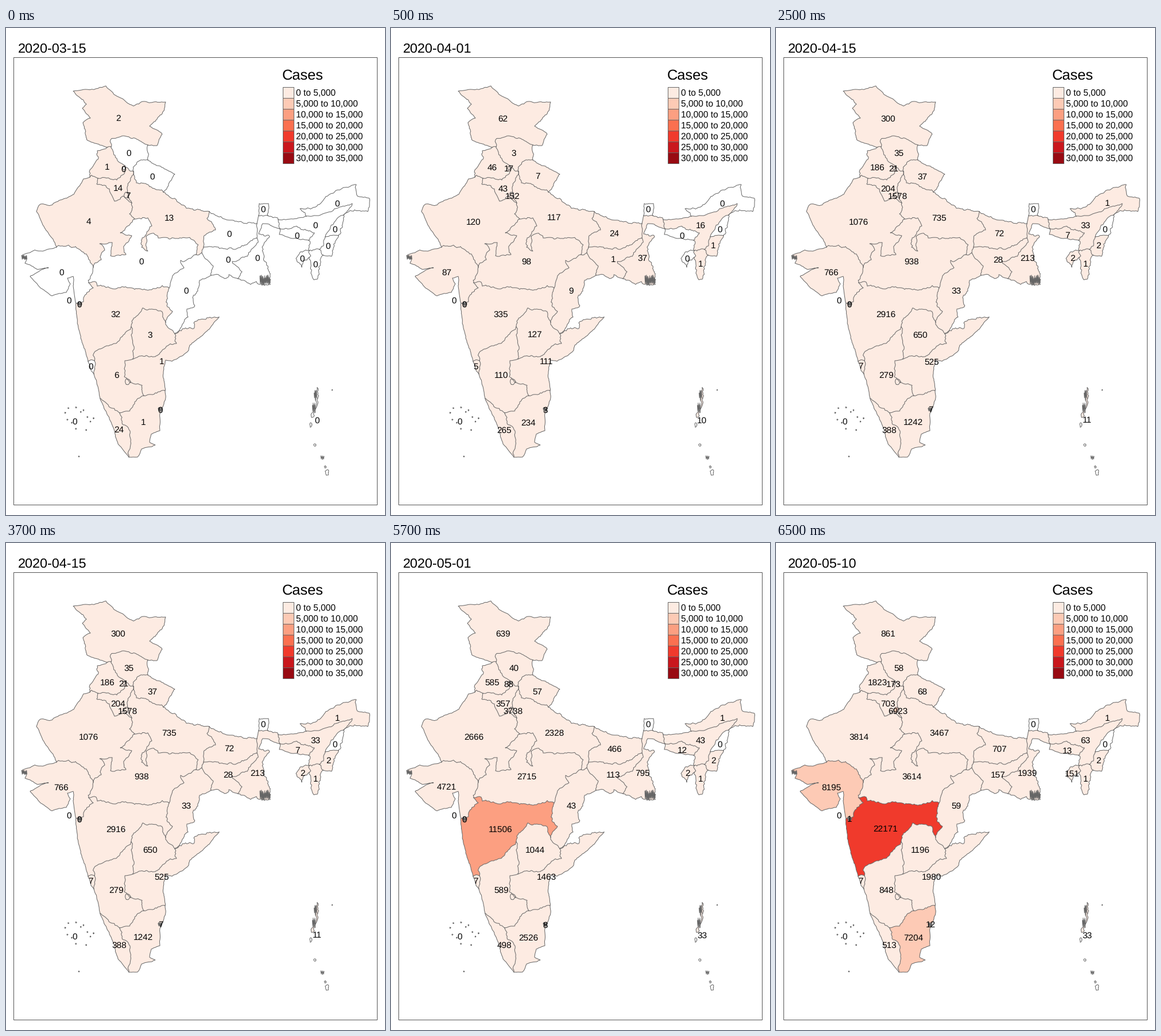
These frames come from a looping animation (660 by 849 pixels, 8 s). A matplotlib script:

```python
import numpy as np
import matplotlib.pyplot as plt
from matplotlib.animation import FuncAnimation
from matplotlib.patches import Polygon, Rectangle

W, H, DPI = 660, 849, 64
PT = 72 / DPI
GREY = "#666666"
REDS = ["#FDEBE2", "#FDCAB5", "#FC9F81", "#FB7050", "#F03A2C", "#C9171D", "#980B13"]
DATES = ["2020-03-15", "2020-04-01", "2020-04-15", "2020-05-01", "2020-05-10"]

plt.rcParams.update({"font.family": "Liberation Sans", "text.hinting": "no_hinting"})
rng = np.random.default_rng(7)
fig = plt.figure(figsize=(W / DPI, H / DPI), dpi=DPI, facecolor="white")
ax = fig.add_axes([0, 0, 1, 1])
ax.set(xlim=(0, W), ylim=(H, 0))
ax.axis("off")
states = []


def write(x, y, s, px, ha="left"):
    return ax.text(x, y, s, fontsize=px * PT, ha=ha, va="baseline", zorder=5)


def draw(x, y):
    ax.plot(x, y, color=GREY, lw=PT, zorder=3, solid_joinstyle="round")


def fractal(a, b, rough):
    """Midpoint displacement from a to b, without b."""
    length = np.hypot(*(b - a))
    if length < 4:
        return [a]
    side = np.array([a[1] - b[1], b[0] - a[0]]) / length
    mid = (a + b) / 2 + side * rng.normal(0, rough) * np.sqrt(length)
    return fractal(a, mid, rough) + fractal(mid, b, rough)


def arc(*points, rough=0.32):
    """Border through a few key points, shared by both neighbours."""
    pts = np.array(points, float)
    line = [p for a, b in zip(pts, pts[1:]) for p in fractal(a, b, rough)]
    line = np.array(line + [pts[-1]])
    draw(*line.T)
    return line


def coast(*points):
    return arc(*points, rough=0.13)


def dist(p, q):
    return np.hypot(*(p - q))


def ring(arcs):
    """Chain arcs into one outline, turning each to follow the last."""
    def gap(p, line):
        return min(dist(p, line[0]), dist(p, line[-1]))

    first, *rest = arcs
    if rest and gap(first[0], rest[0]) < gap(first[-1], rest[0]):
        first = first[::-1]
    chain = [first]
    for line in rest:
        end = chain[-1][-1]
        chain.append(line if dist(end, line[0]) <= dist(end, line[-1]) else line[::-1])
    return np.vstack(chain)


def state(x, y, counts, *arcs):
    patch = ax.add_patch(Polygon(ring(arcs), lw=0, zorder=2)) if arcs else None
    states.append((patch, write(x, y + 5.4, "", 15.4, "center"), counts))


def islet(x, y, rx, ry, n=9):
    a = np.linspace(0, 2 * np.pi, n + 1)
    r = rng.uniform(0.7, 1.2, n)[np.arange(n + 1) % n]
    return coast(*zip(x + rx * r * np.cos(a), y + ry * r * np.sin(a)))


def creeks(x, y, w, h, n):
    """Ragged strip of tidal channels, drawn as one uneven zigzag."""
    xs = np.linspace(x - w / 2, x + w / 2, n)
    ends = np.where(np.arange(n) % 2, 1, -1)
    draw(xs, y + ends * h / 2 * rng.uniform(0.4, 1.1, n))


# North
jk_out = arc((176, 208), (142, 196), (134, 165), (147, 157), (133, 140), (140, 133),
             (117, 110), (174, 101), (190, 117), (222, 136), (240, 128), (278, 129),
             (274, 145), (250, 171), (272, 185), (263, 205), (247, 204), rough=0.2)
jk_pb = arc((176, 208), (183, 207))
jk_hp = arc((183, 207), (182, 195), (205, 188), (228, 194), (247, 204))
hp_uk = arc((247, 204), (247, 230), (229, 233), (222, 250))
hp_hr = arc((222, 250), (207, 240))
pb_hp = arc((207, 240), (190, 222), (183, 207))
pb_west = arc((176, 208), (159, 214), (161, 225), (145, 251), (146, 260))
pb_rj = arc((146, 260), (160, 262))
pb_hr = arc((160, 262), (193, 265), (207, 251), (207, 240))
hr_rj = arc((160, 262), (158, 272), (174, 275), (189, 302), (203, 293), (219, 305))
hr_up = arc((222, 250), (211, 280), (219, 305))
uk_out = arc((247, 230), (265, 240), (294, 255), (274, 286), rough=0.2)
uk_up = arc((274, 286), (243, 271), (227, 270), (222, 250))
up_nepal = arc((274, 286), (318, 314), (354, 320))
up_br = arc((354, 320), (350, 332), (365, 352), (345, 362), (344, 382))
up_jh = arc((344, 382), (341, 392))
up_cg = arc((341, 392), (331, 395))
rj_up = arc((219, 305), (215, 324), (224, 333))
mp_up_west = arc((224, 333), (247, 331), (254, 345), (237, 366), (236, 382), (247, 389), (244, 363))
mp_up_east = arc((244, 363), (284, 368), (327, 370), (331, 395), rough=0.55)

# West
rj_west = arc((146, 260), (135, 263), (118, 290), (78, 309), (60, 307), (53, 320),
              (66, 346), (88, 382), rough=0.18)
rj_gj = arc((88, 382), (121, 381), (140, 394), (152, 417))
rj_mp = arc((224, 333), (199, 357), (219, 362), (208, 377), (209, 395), (182, 397),
            (185, 374), (163, 376), (172, 387), (166, 404), (152, 417))
gj_coast = coast((88, 382), (64, 389), (50, 387), (27, 397), (36, 403), (33, 410),
                 (55, 421), (74, 418), (42, 433), (58, 451), (80, 467), (105, 461),
                 (112, 446), (107, 436), (117, 433), (117, 449), (122, 480))
gj_mh = arc((122, 480), (135, 477), (138, 465), (152, 453), (144, 444))
gj_mp = arc((152, 417), (149, 430), (144, 444))
mp_mh = arc((144, 444), (157, 443), (159, 450), (190, 455), (208, 451), (222, 454),
            (255, 455), (272, 449), (284, 453))
mp_cg = arc((284, 453), (290, 432), (310, 418), (304, 405), (331, 395))

# East
br_nepal = arc((354, 320), (390, 335), (437, 341))
br_wb = arc((437, 341), (437, 366))
br_jh = arc((344, 382), (370, 382), (405, 383), (437, 366))
jh_cg = arc((341, 392), (361, 415), (357, 431))
jh_south = arc((357, 431), (370, 430), (381, 437), (388, 430), (404, 437))
jh_wb = arc((437, 366), (437, 375), (418, 398), (394, 407), (411, 425), (404, 437))
wb_coast = arc((404, 437), (415, 440), (426, 447), (436, 442), (441, 447), (460, 447), rough=0.2)
wb_bd = arc((460, 447), (456, 415), (446, 382), (459, 364), (440, 359), (447, 341), (477, 350))
wb_nepal = arc((437, 341), (440, 327))
wb_sk = arc((440, 327), (456, 327))
wb_bhutan = arc((456, 327), (474, 334))
sk_out = arc((440, 327), (441, 306), (457, 306), (456, 327), rough=0.2)
cg_east = arc((357, 431), (337, 440), (325, 470), (328, 486), (315, 490), (317, 504), (294, 533))
cg_mh = arc((284, 453), (281, 486), (290, 494), (278, 513))
cg_tg = arc((278, 513), (294, 533))

# North-east
as_wb = arc((474, 334), (477, 350))
as_bhutan = arc((474, 334), (500, 333), (523, 328), rough=0.15)
as_ar = arc((523, 328), (545, 327), (572, 315), (603, 306), (588, 326), rough=0.2)
as_nl = arc((588, 326), (572, 338), (556, 364))
as_mn = arc((556, 364), (546, 386))
as_mz = arc((546, 386), (528, 388))
as_bd = arc((528, 388), (527, 370))
as_ml = arc((527, 370), (537, 357), (504, 346), (477, 350))
ml_out = arc((477, 350), (476, 360), (500, 367), (527, 370), rough=0.2)
ar_out = arc((523, 328), (512, 315), (533, 314), (552, 301), (560, 293), (590, 278),
             (610, 273), (612, 293), (633, 297), (630, 320), (607, 317), (588, 326), rough=0.22)
nl_out = arc((588, 326), (586, 347), (579, 362))
mn_nl = arc((556, 364), (579, 362))
mn_out = arc((579, 362), (567, 398), (552, 396))
mn_mz = arc((552, 396), (546, 386))
mz_out = arc((552, 396), (546, 420), (542, 438), (536, 439), (528, 400))
mz_tr = arc((528, 400), (528, 388))
tr_out = arc((528, 388), (512, 391), (505, 402), (515, 417), (528, 400))

# South
mh_coast = coast((122, 480), (123, 500), (130, 540), (143, 581))
mh_ga = arc((143, 581), (154, 580))
ga_ka = arc((154, 580), (153, 603))
ga_coast = coast((143, 581), (148, 597), (153, 603))
mh_ka = arc((154, 580), (153, 567), (179, 554), (196, 546), (218, 521))
mh_tg = arc((278, 513), (269, 493), (238, 488), (222, 506), (218, 521))
ka_tg = arc((218, 521), (221, 577))
tg_ap = arc((221, 577), (258, 573), (283, 553), (297, 550), (294, 533))
ap_north = arc((294, 533), (308, 524), (327, 524), (327, 514), (350, 505), (371, 504))
ap_coast = coast((371, 504), (354, 525), (320, 553), (318, 562), (289, 581), (278, 579),
                 (274, 600), (277, 632))
ka_ap = arc((221, 577), (207, 580), (206, 608), (222, 620), (237, 623), (240, 641))
ap_tn = arc((240, 641), (260, 636), (277, 632))
ka_tn = arc((240, 641), (224, 655), (213, 668), (198, 671))
ka_coast = coast((153, 603), (160, 625), (164, 646))
ka_kl = arc((164, 646), (178, 657), (198, 671))
kl_coast = coast((164, 646), (184, 690), (195, 725), (214, 748))
kl_tn = arc((198, 671), (202, 688), (214, 700), (214, 748))
tn_coast = coast((214, 748), (229, 748), (236, 734), (260, 727), (250, 722), (253, 708),
                 (268, 702), (268, 672), (278, 645), (277, 632))

# Small territories and islands
city = islet(205.5, 244, 2.5, 3)
delhi = islet(210, 291, 4.5, 6)
west_enclave = islet(128, 481, 3.5, 4)
south_enclave = islet(268, 665, 3, 3.5)
islet(212, 617, 5, 5)
andaman = arc((542, 627), (543, 646), (537, 676), (532, 679), (538, 640), (542, 627))
creeks(451, 440, 18, 17, 26)
creeks(32, 400, 9, 7, 14)
creeks(128, 481, 5, 6, 9)
creeks(268, 665, 5, 7, 9)
creeks(539, 640, 5, 16, 8)
creeks(536, 662, 5, 16, 8)
creeks(551, 749, 6, 8, 7)
islet(531, 692, 2, 4)
islet(538, 727, 2, 2)
islet(556, 765, 1.5, 2)
islet(559, 775, 3, 6)
islet(568, 631, 0.7, 0.7)
islet(127, 747, 0.8, 1)
for angle in np.linspace(0, 2 * np.pi, 12):
    x, y = rng.normal(0, 4, 2) + [123 + 21 * np.cos(angle), 679 + 21 * np.sin(angle)]
    islet(x, y, 0.8, 1)

zeros = (0,) * 5
state(195, 157, (2, 62, 300, 639, 861), jk_out, jk_hp, jk_pb)
state(214, 217, (0, 3, 35, 40, 58), jk_hp, hp_uk, hp_hr, pb_hp)
state(176.5, 242, (1, 46, 186, 585, 1823), jk_pb, pb_west, pb_rj, pb_hr, pb_hp)
state(255, 258, (0, 7, 37, 57, 68), hp_uk[hp_uk[:, 1] >= 230], uk_out, uk_up)
state(195.5, 279, (14, 43, 204, 357, 703), pb_hr, hp_hr, hr_up, hr_rj)
state(144, 337, (4, 120, 1076, 2666, 3814), pb_rj, rj_west, rj_gj, rj_mp, rj_up, hr_rj)
state(284, 330, (13, 117, 735, 2328, 3467), uk_up, up_nepal, up_br, up_jh, up_cg,
      mp_up_east, mp_up_west, rj_up, hr_up)
state(205, 245, (0, 17, 21, 88, 173), city)
state(212, 292, (7, 152, 1578, 3738, 6923), delhi)
state(389, 358, (0, 24, 72, 466, 707), up_br, br_nepal, br_wb, br_jh)
state(448, 315, zeros, sk_out, wb_sk)
state(577, 305, (0, 0, 1, 1, 1), as_ar, ar_out)
state(539, 343, (0, 16, 33, 43, 63), as_wb, as_bhutan, as_ar, as_nl, as_mn, as_mz, as_bd, as_ml)
state(573, 350, zeros, as_nl, nl_out, mn_nl)
state(507, 361, (0, 0, 7, 12, 13), as_ml, ml_out)
state(561, 379, (0, 1, 2, 2, 2), as_mn, mn_nl, mn_out, mn_mz)
state(539, 411, (0, 1, 1, 1, 1), as_mz, mn_mz, mz_out, mz_tr)
state(516, 401, (0, 0, 2, 2, 151), tr_out, mz_tr)
state(438, 400, (0, 37, 213, 795, 1939), br_wb, jh_wb, wb_coast, wb_bd, as_wb,
      wb_bhutan, wb_sk, wb_nepal)
state(387, 403, (0, 1, 28, 113, 157), br_jh, jh_wb, jh_south, jh_cg, up_jh)
state(314, 457, (0, 9, 33, 43, 59), mp_cg, up_cg, jh_cg, cg_east, cg_tg, cg_mh)
state(236, 406, (0, 98, 938, 2715, 3614), rj_mp, mp_up_west, mp_up_east, mp_cg, mp_mh, gj_mp)
state(96.5, 425, (0, 87, 766, 4721, 8195), rj_gj, gj_coast, gj_mh, gj_mp)
state(110, 474, zeros)
state(128, 481, (0, 0, 0, 0, 1), west_enclave)
state(191, 498, (32, 335, 2916, 11506, 22171), mp_mh, cg_mh, mh_tg, mh_ka, mh_ga, mh_coast, gj_mh)
state(251, 534, (3, 127, 650, 1044, 1196), mh_tg, cg_tg, tg_ap, ka_tg)
state(271, 581, (1, 111, 525, 1463, 1980), tg_ap, ap_north, ap_coast, ap_tn, ka_ap)
state(192, 604, (6, 110, 279, 589, 848), mh_ka, ka_tg, ka_ap, ka_tn, ka_kl, ka_coast, ga_ka)
state(147.5, 589, (0, 5, 7, 7, 7), mh_ga, ga_ka, ga_coast)
state(239, 687, (1, 234, 1242, 2526, 7204), ap_tn, tn_coast, kl_tn, ka_tn)
state(269, 665, (0, 3, 7, 8, 12), south_enclave)
state(197, 700, (24, 265, 388, 498, 513), ka_kl, kl_tn, kl_coast)
state(120, 685, zeros)
state(541.5, 683, (0, 10, 11, 33, 33), andaman)

# Frame, title and legend
ax.add_patch(Rectangle((12.8, 50.8), 633, 780, fill=False, ec="#555555", lw=PT))
title = write(20.5, 42.3, "", 23.4)
write(480.5, 89.7, "Cases", 25.4)
for i, color in enumerate(REDS):
    top = 103.2 + 18.9 * i
    ax.add_patch(Rectangle((481.6, top), 18.9, 18.9, fc=color, ec=GREY, lw=PT))
    write(505, top + 15.2, f"{5000 * i:,} to {5000 * (i + 1):,}", 15.5)


def update(frame):
    stage = (frame + 3) // 4  # the first date shows for one step, later ones for four
    title.set_text(DATES[stage])
    for patch, label, counts in states:
        count = counts[stage]
        label.set_text(str(count))
        if patch:
            patch.set_facecolor(REDS[count // 5000] if count else "white")
    return []


anim = FuncAnimation(fig, update, frames=16, interval=500, repeat=True, repeat_delay=0)
plt.show()
```
